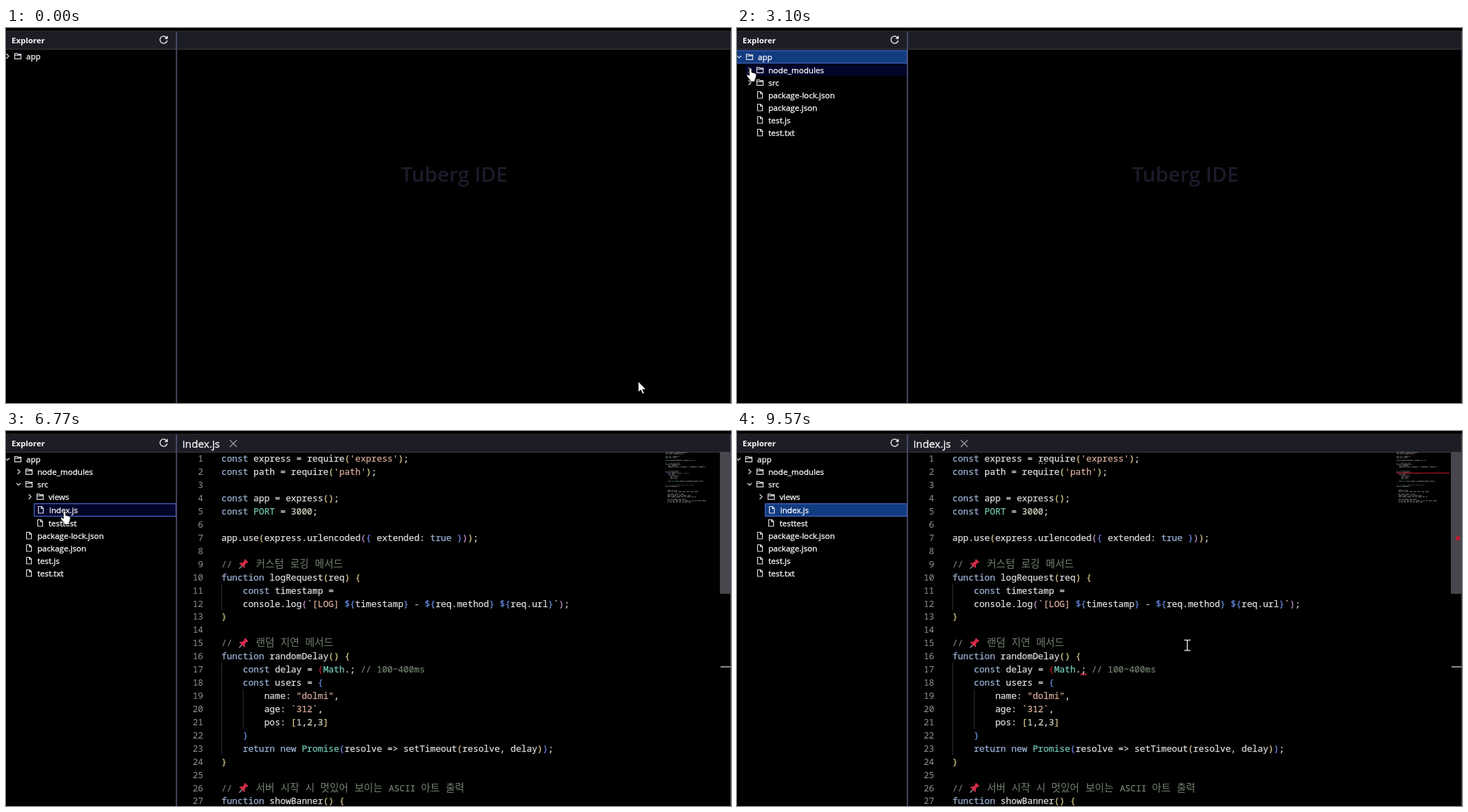
Recreate the animation shown at these times as an HTML page. Size 1040x539 px, loop 9610 ms.

```html
<!DOCTYPE html>
<html lang="en">
<head>
<meta charset="utf-8">
<title>Code editor</title>
<style>
html, body { margin: 0; width: 100%; height: 100%; overflow: hidden; background: #000; }
svg { display: block; width: 1040px; height: 539px; font-family: "Open Sans", "Noto Sans", sans-serif; }
.label { font-size: 11.6px; fill: #f4f4f8; stroke: #f4f4f8; stroke-width: .35; }
.icon { fill: none; stroke: #dedee4; stroke-width: 1.2; }
.code { font: 12.8px "Noto Sans Mono", monospace; stroke-width: .25; }
.hangul { font: 300 14.6px "Noto Sans CJK KR", "Noto Sans CJK", sans-serif; }
</style>
</head>
<body>
<svg viewBox="0 0 1040 539">
  <rect width="1040" height="539" fill="#000"/>
  <text x="643" y="221" font-size="29.5" font-weight="600" fill="#1c1b2b" text-anchor="middle" id="title">Tuberg IDE</text>
  <rect y="4" width="1040" height="26" fill="#1d1d25"/>
  <path d="M0 4.5H1040" stroke="#2a2a32"/>
  <path d="M0 30.5H1040" stroke="#3a3a42"/>
  <text x="8" y="22" font-size="11.4" font-weight="700" fill="#fafafc">Explorer</text>
  <path d="M230.6 14.2A5.2 5.2 0 1 0 231.2 18M231.4 11.4V15H227.8" fill="none" stroke="#ececf0" stroke-width="1.4"/>
  <g id="tree"></g>
  <g id="editor">
    <rect x="246" y="31" width="793" height="508" fill="#000"/>
    <text x="253" y="23.5" font-size="15.2" fill="#f0f0f4" stroke="#f0f0f4" stroke-width=".35">index.js</text>
    <path d="M321 13L331 23M331 13L321 23" stroke="#9a9aa0" stroke-width="1.3"/>
    <g id="code"></g>
    <rect x="1024" y="30" width="15" height="204" fill="#47474d"/>
    <path d="M1025 339H1039" stroke="#8a8a90" stroke-width="2"/>
    <g id="marks">
      <path d="M946 60.5H1022" stroke="#90101c" stroke-width="1.6"/>
      <rect x="1031" y="151.5" width="6" height="5.5" fill="#c01c30"/>
      <path d="M493 351l2-2.5 2 2.5 2-2.5 2 2.5" fill="none" stroke="#d83848" stroke-width="1.3"/>
      <path d="M433 46.5H444" stroke="#a8a8a8" stroke-width="1.6" stroke-dasharray="1.6 2.4"/>
    </g>
  </g>
  <path d="M244.5 5V539" stroke="#55557c" stroke-width="1.6"/>
  <path d="M1039.5 5V539" stroke="#4c4c5c"/>
  <g id="pointer">
    <path id="arrow" d="M0 0V15.5L3.6 12.2 6.2 18 8.6 17 6.1 11.4H11Z" fill="#fff" stroke="#000" stroke-width=".8"/>
    <path id="hand" d="M-1.8 1.5Q-1.6 0 0 0 1.5 0 1.6 1.5V6.2L6.4 7.4Q8.4 8 8.4 10L7.6 14.5 6.2 17V19.5H-.6V17.5L-5 12Q-6.2 9.8-4.4 9.3-3.4 9.2-1.8 11Z" fill="#fff" stroke="#000" stroke-width=".8"/>
    <path id="beam" d="M-4.5-7.5H-1.5Q0-7.5 0-6 0-7.5 1.5-7.5H4.5M0-6.5V6.5M-4.5 7.5H-1.5Q0 7.5 0 6 0 7.5 1.5 7.5H4.5" fill="none" stroke="#d8d8d8" stroke-width="1.5"/>
  </g>
</svg>
<script>
const LOOP = 9610;
const OPEN_APP = 1800, CLICK_SRC = 4200, OPEN_SRC = 4650, CLICK_FILE = 6030, OPEN_FILE = 6350, LINT = 7500;
const CHAR = 7.68, LEFT = 309, LINE = 18.93;
const $ = id => document.getElementById(id);

// Pointer stops: time, x, y
const stops = [
  [0, 907, 508], [150, 907, 508], [1400, 19, 45], [2970, 19, 45], [3270, 20, 76],
  [4950, 20, 76], [5300, 58, 121], [5470, 58, 121], [5670, 84, 115], [7050, 84, 115],
  [7700, 700, 245], [8000, 700, 245], [8200, 673, 271], [8900, 646, 308], [LOOP, 646, 308]
];

function pointerAt(t) {
  const i = stops.findIndex(s => s[0] > t);
  const [a, b] = [stops[i - 1], stops[i]];
  const k = (t - a[0]) / (b[0] - a[0]);
  const e = k * k * (3 - 2 * k);
  return [a[1] + (b[1] - a[1]) * e, a[2] + (b[2] - a[2]) * e];
}

// Explorer tree
function visibleRows(t) {
  const row = (name, level, open) => ({ name, level, open, folder: open !== undefined });
  const rows = [row('app', 0, t >= OPEN_APP)];
  if (t < OPEN_APP) return rows;
  rows.push(row('node_modules', 1, false), row('src', 1, t >= CLICK_SRC));
  if (t >= OPEN_SRC) rows.push(row('views', 2, false), row('index.js', 2), row('testtest', 2));
  ['package-lock.json', 'package.json', 'test.js', 'test.txt'].forEach(n => rows.push(row(n, 1)));
  return rows;
}

function focusedName(t) {
  if (t < OPEN_APP) return '';
  return t < CLICK_SRC ? 'app' : t < CLICK_FILE ? 'src' : 'index.js';
}

function layout(t, px, py) {
  const focus = focusedName(t);
  let y = 32;
  return visibleRows(t).map(r => {
    const focused = r.name === focus, h = focused ? 20 : 18;
    const left = 16 * r.level - (r.folder ? 4 : -8);
    const hover = px >= left && px < 244 && py >= y && py < y + h;
    const item = { ...r, focused, h, left, hover, y };
    y += h;
    return item;
  });
}

function drawRow(r) {
  const shift = r.focused ? 1 : 0, x = 16 * r.level + shift, cy = r.y + r.h / 2;
  const fill = r.hover ? '#03042a' : r.focused ? '#123c80' : 'none';
  const edge = r.focused ? '#4264c4' : 'none';
  const box = `<rect x="${r.left + .5}" y="${r.y + .5}" width="${243.5 - r.left}" height="${r.h - 2}" fill="${fill}" stroke="${edge}" stroke-width="1.3"/>`;
  const chevron = !r.folder ? '' : r.open ? 'M-1 -1.5L2 1.5 5 -1.5' : 'M.5 -3.5L4 0 .5 3.5';
  const icon = r.folder
    ? 'M12.5 -4H16L17 -2.8H21.5V3.8H12.5ZM12.5 -1.4H21.5'
    : 'M13.5 -5H18L20.5 -2.4V4.5H13.5ZM17.6 -5V-2H20.5';
  return `${box}<path class="icon" transform="translate(${x} ${cy - .5})" d="${chevron}${icon}"/>
    <text class="label" x="${x + 29}" y="${cy + 4.2}">${r.name}</text>`;
}

// Source listing
const source = `const express = require('express');
const path = require('path');

const app = express();
const PORT = 3000;

app.use(express.urlencoded({ extended: true }));

// 📌 커스텀 로깅 메서드
function logRequest(req) {
    const timestamp =
    console.log(\`[LOG] \${timestamp} - \${req.method} \${req.url}\`);
}

// 📌 랜덤 지연 메서드
function randomDelay() {
    const delay = (Math.; // 100~400ms
    const users = {
        name: "dolmi",
        age: \`312\`,
        pos: [1,2,3]
    }
    return new Promise(resolve => setTimeout(resolve, delay));
}

// 📌 서버 시작 시 멋있어 보이는 ASCII 아트 출력
function showBanner() {`.split('\n');

const COLOR = {
  comment: '#71806e', string: '#d6ab98', keyword: '#9db4d8', type: '#74c8b4',
  number: '#ccd6c2', plain: '#dedee2', bad: '#c02030'
};
const BRACKETS = ['#dccb8c', '#cc92d0', '#6a8ee8'];
const TOKEN = /\/\/.*|`[^`]*`|'[^']*'|"[^"]*"|[\w$]+|[()[\]{}]|[^\s\w()[\]{}'"`]+|\s+/g;
const KEYWORD = /^(const|function|return|new|true)$/;
let depth = 0;

function colorOf(word, line) {
  if (/^[([{]$/.test(word)) {
    const c = BRACKETS[depth++ % 3];
    return line === 17 && word === '(' ? COLOR.bad : c;
  }
  if (/^[)\]}]$/.test(word)) return BRACKETS[--depth % 3];
  if (word.startsWith('//')) return COLOR.comment;
  if (/^['"]/.test(word)) return COLOR.string;
  if (KEYWORD.test(word)) return COLOR.keyword;
  if (/^\d/.test(word)) return COLOR.number;
  return /^[A-Z]/.test(word) ? COLOR.type : COLOR.plain;
}

function tokens(text, line) {
  if (text[0] === '}') depth = 1;
  return (text.match(TOKEN) || []).flatMap(word => {
    if (word[0] !== '`') return [[word, colorOf(word, line)]];
    return word.split(/(\$\{[^}]*\})/).flatMap(part => part.startsWith('${')
      ? [['${', BRACKETS[2]], [part.slice(2, -1), COLOR.plain], ['}', BRACKETS[2]]]
      : [[part, COLOR.string]]);
  });
}

const isHangul = s => /[가-힣]/.test(s);
const widthOf = s => s === '📌' ? 18.7 : isHangul(s) ? s.length * 13.85 : s.length * CHAR;

function pin(x, y) {
  return `<g transform="translate(${x + 8.5} ${y - 4.5}) rotate(42)">
    <path d="M0 2V9" stroke="#9a9aa4" stroke-width="1.3"/>
    <path d="M-3.2-7H3.2V-5L2-4 2.6 0 5 2V3.4H-5V2L-2.6 0-2-4-3.2-5Z" fill="#d42a4c"/></g>`;
}

function drawCode() {
  let out = '', map = '';
  source.forEach((text, i) => {
    const y = 44.3 + i * LINE, my = 30.5 + i * 1.87;
    let x = LEFT;
    out += `<text class="code" x="283" y="${y}" text-anchor="end" fill="#909098">${i + 1}</text>`;
    for (const [chunk, color] of tokens(text, i + 1)) {
      for (const word of chunk.match(/\s+|\S+/g) || []) {
        const w = widthOf(word);
        if (word === '📌') out += pin(x, y);
        else if (word.trim()) {
          out += `<text class="${isHangul(word) ? 'hangul' : 'code'}" x="${x}" y="${y}" fill="${color}" stroke="${isHangul(word) ? 'none' : color}">${word}</text>`;
          map += `<rect x="${946 + (x - LEFT) * .117}" y="${my}" width="${w * .117 - .3}" height="1.1" fill="${color}"/>`;
        }
        x += w;
      }
    }
  });
  // Minimap lines below the visible part
  let seed = 7;
  const rnd = () => (seed = seed * 16807 % 2147483647) / 2147483647;
  for (let i = 27; i < 40; i++) {
    if (i === 28 || i % 4 === 3) continue;
    const end = 962 + rnd() * 42;
    for (let x = 949; x < end;) {
      const w = 1 + rnd() * 5;
      map += `<rect x="${x}" y="${30.5 + i * 1.87}" width="${w}" height="1.1" fill="${COLOR.plain}"/>`;
      x += w + 1.5;
    }
  }
  const guide = (col, from, to) =>
    `M${LEFT + col * CHAR + .5} ${30.5 + (from - 1) * LINE}V${30.5 + to * LINE}`;
  $('code').innerHTML = `<path d="${guide(0, 11, 12)}${guide(0, 17, 23)}${guide(4, 19, 21)}" stroke="#303034"/>
    ${out}<g opacity=".5">${map}</g>`;
}

const show = (id, on) => $(id).setAttribute('visibility', on ? 'visible' : 'hidden');
let lastTree = '';

function render(t) {
  const [x, y] = pointerAt(t);
  const rows = layout(t, x, y);
  const html = rows.map(drawRow).join('');
  if (html !== lastTree) $('tree').innerHTML = lastTree = html;
  const editing = t >= OPEN_FILE;
  const overRow = rows.some(r => r.hover), overCode = editing && x > 246;
  $('editor').style.display = editing ? '' : 'none';
  show('title', !editing);
  show('marks', t >= LINT);
  show('hand', overRow);
  show('beam', overCode);
  show('arrow', !overRow && !overCode);
  $('pointer').setAttribute('transform', `translate(${x.toFixed(2)} ${y.toFixed(2)})`);
}

drawCode();
render(0);
const start = performance.now();
(function tick() {
  render((performance.now() - start) % LOOP);
  requestAnimationFrame(tick);
})();
</script>
</body>
</html>
```
